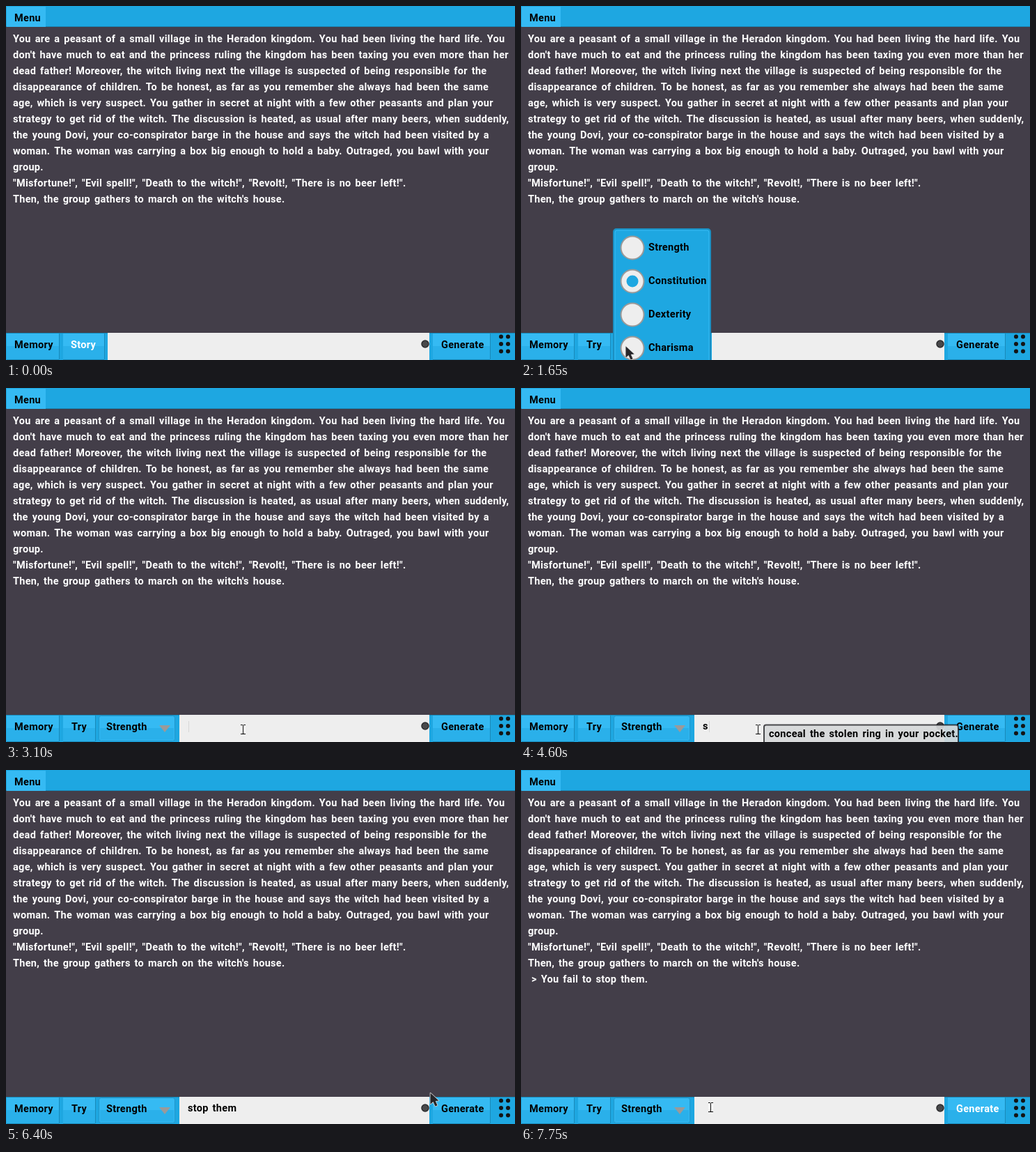
Animation, 731 px wide and 508 px high, one loop 8000 ms. Source, as an HTML page with a canvas:

```html
<!DOCTYPE html>
<html lang="en">
<head>
<meta charset="utf-8">
<title>Story game</title>
<style>
  html, body { margin: 0; width: 100%; height: 100%; overflow: hidden; background: #433e49; }
  canvas { display: block; }
</style>
</head>
<body>
<canvas id="stage" width="731" height="508"></canvas>
<script>
const ctx = document.getElementById('stage').getContext('2d');
const LOOP = 8000, STEP = 50;
const BLUE = '#1ea7e1', LIGHT = '#35baf3', SHADE = '#2ab0ea', EDGE = '#1989b9', PALE = '#eeeeee';
const BLACK = '#000', WHITE = '#fff', PRESSED = '#66727a';
const TOP = 469, INPUT_END = 608;

const STORY = [
  'You are a peasant of a small village in the Heradon kingdom. You had been living the hard life. You',
  "don't have much to eat and the princess ruling the kingdom has been taxing you even more than her",
  'dead father! Moreover, the witch living next the village is suspected of being responsible for the',
  'disappearance of children. To be honest, as far as you remember she always had been the same',
  'age, which is very suspect. You gather in secret at night with a few other peasants and plan your',
  'strategy to get rid of the witch. The discussion is heated, as usual after many beers, when suddenly,',
  'the young Dovi, your co-conspirator barge in the house and says the witch had been visited by a',
  'woman. The woman was carrying a box big enough to hold a baby. Outraged, you bawl with your',
  'group.',
  '"Misfortune!", "Evil spell!", "Death to the witch!", "Revolt!, "There is no beer left!".',
  "Then, the group gathers to march on the witch's house."
];
const STATS = ['Strength', 'Constitution', 'Dexterity', 'Charisma'];
const TYPED = 'stop them';
const KEY_TIMES = [4600, 4750, 4800, 4950, 5050, 5150, 5250, 5300, 5400];

// Pointer path: time, x, y
const PATH = [
  [0, 124, -22], [500, 109, 482], [700, 107, 490], [1400, 107, 490],
  [1600, 150, 488], [1750, 150, 488], [2050, 152, 440], [2300, 146, 385],
  [2550, 152, 344], [2650, 152, 344], [2950, 340, 489], [3100, 340, 490],
  [6100, 340, 490], [6300, 560, 460], [6400, 609, 463], [6500, 640, 482],
  [6800, 640, 484], [7300, 118, 313], [7400, 118, 313], [7750, 272, 484], [8000, 272, 484]
];

// Right side of the button, left side of the next item, label x
const MODES = {
  Story: [141, 146, 93], Do: [125, 130, 96], Say: [129, 134, 94], Try: [128, 132, 94]
};

function pointer(t) {
  let i = 1;
  while (i < PATH.length - 1 && PATH[i][0] < t) i++;
  const [t0, x0, y0] = PATH[i - 1], [t1, x1, y1] = PATH[i];
  const u = (t - t0) / (t1 - t0), e = u * u * (3 - 2 * u);
  return { x: Math.round(x0 + (x1 - x0) * e), y: Math.round(y0 + (y1 - y0) * e) };
}

function rect(x, y, w, h, color) {
  ctx.fillStyle = color;
  ctx.fillRect(x, y, w, h);
}

function panel(x, y, w, h, r, fill, stroke, width = 1) {
  ctx.beginPath();
  ctx.roundRect(x, y, w, h, r);
  ctx.fillStyle = fill;
  ctx.fill();
  ctx.strokeStyle = stroke;
  ctx.lineWidth = width;
  ctx.stroke();
}

function disc(x, y, r, fill, stroke, width) {
  ctx.beginPath();
  ctx.arc(x, y, r, 0, 7);
  ctx.fillStyle = fill;
  ctx.fill();
  if (!stroke) return;
  ctx.strokeStyle = stroke;
  ctx.lineWidth = width;
  ctx.stroke();
}

function label(s, x, y, color = BLACK) {
  ctx.fillStyle = color;
  ctx.fillText(s, x, y);
}

function button(x, right, text, textX, color) {
  const y = TOP + 1, h = 37;
  rect(x, y, right - x, h, LIGHT);
  rect(x, y + 18, right - x, h - 18, SHADE);
  rect(right, y, 1, h, EDGE);
  rect(x, y + h, right - x, 1, EDGE);
  label(text, textX, 491, color);
}

function dropdown(text, color) {
  const right = 144 + Math.round(ctx.measureText(text).width) + 40;
  panel(133.5, 470.5, right - 134, 36, 3, LIGHT, '#2196cb');
  rect(135, 488, right - 137, 17, SHADE);
  label(text, 144, 491, color);
  ctx.beginPath();
  ctx.moveTo(right - 23, 484);
  ctx.lineTo(right - 7, 484);
  ctx.lineTo(right - 15, 494);
  ctx.fillStyle = '#9a9a9a';
  ctx.fill();
  return right + 6;
}

function popup(p, picked, hover) {
  panel(133, 320, 139, 200, 4, BLUE, '#1b8fc2', 2);
  panel(135, 322, 135, 200, 3, BLUE, LIGHT);
  STATS.forEach((s, i) => {
    const y = 347 + 48 * i;
    disc(160, y, 16.5, PALE, '#999', 2);
    if (i === picked) disc(160, y, 8.5, BLUE);
    label(s, 183, y + 4, hover && Math.abs(p.y - y) < 22 ? WHITE : BLACK);
  });
}

function tooltip() {
  panel(349, 483.5, 279, 30, 3, 'rgba(214,216,218,.92)', 'rgba(20,20,24,.75)', 2);
  label('conceal the stolen ring in your pocket.', 356, 501);
}

function arrow({ x, y }) {
  const pts = [[0, 0], [0, 16], [4, 12.5], [7, 19], [10, 17.7], [7.2, 11.5], [12, 11]];
  ctx.beginPath();
  pts.forEach(([dx, dy]) => ctx.lineTo(x + dx + .5, y + dy + .5));
  ctx.closePath();
  ctx.lineJoin = 'round';
  ctx.lineWidth = 1.6;
  ctx.strokeStyle = '#d8d8d8';
  ctx.stroke();
  ctx.fillStyle = '#26262a';
  ctx.fill();
}

function beam({ x, y }) {
  rect(x - 3, y - 7, 7, 14, WHITE);
  rect(x, y - 6, 1, 13, BLACK);
  for (const dy of [-7, 6]) {
    rect(x - 3, y + dy, 3, 1, BLACK);
    rect(x + 1, y + dy, 3, 1, BLACK);
  }
}

function draw(t) {
  const p = pointer(t);
  const during = (a, b) => t >= a && t < b;
  const isOpen = during(1600, 2700), sent = t >= 6800;
  const mode = t < 650 ? 'Story' : t < 950 ? 'Do' : t < 1200 ? 'Say' : 'Try';
  const down = during(550, 650) || during(900, 950) || during(1150, 1200);
  const [modeEnd, next, modeX] = MODES[mode];

  rect(0, 0, 731, 508, '#433e49');
  rect(0, 0, 731, 30, BLUE);
  rect(0, 29, 731, 1, EDGE);
  rect(1, 1, 56, 29, LIGHT);
  ctx.font = 'bold 14.5px Roboto, sans-serif';
  ctx.letterSpacing = '0.3px';
  ctx.wordSpacing = '2px';
  label('Menu', 12, 22);
  STORY.forEach((line, i) => label(line, 10, 52 + 23 * i, WHITE));
  if (sent) label('> You fail to stop them.', 15, 305, WHITE);

  rect(0, TOP, 731, 39, BLUE);
  rect(0, TOP, 731, 1, EDGE);
  button(1, 76, 'Memory', 12, BLACK);
  button(82, modeEnd, mode, modeX, down ? PRESSED : t < 1500 ? WHITE : BLACK);

  let inputX = next;
  if (mode === 'Try') {
    const onDrop = during(1500, 1600) || during(2700, 2900);
    inputX = dropdown(t < 2700 ? 'Constitution' : 'Strength', onDrop ? WHITE : BLACK);
  }
  rect(inputX, TOP, INPUT_END - inputX, 39, PALE);
  const typed = sent ? '' : TYPED.slice(0, KEY_TIMES.filter(k => t >= k).length);
  label(typed, 261, 490);
  if (during(2950, 5400)) rect(262 + Math.round(ctx.measureText(typed).width), 478, 1, 16, '#d6d6d6');
  disc(602, 485, 5, '#48484a', '#2c2c2e', 1.5);

  button(613, 695, 'Generate', 625, during(6700, 6800) ? PRESSED : t >= 6500 ? WHITE : BLACK);
  for (const x of [711, 721]) for (const y of [474.5, 485, 495.5]) disc(x, y, 3, '#141414');

  if (isOpen) popup(p, t < 2550 ? 1 : 0, t >= 1800);
  if (during(3650, 6150)) tooltip();

  const overInput = !isOpen && p.y > TOP && p.x > inputX && p.x < INPUT_END;
  (overInput ? beam : arrow)(p);
}

function tick(now) {
  draw(Math.floor(now % LOOP / STEP) * STEP);
  requestAnimationFrame(tick);
}
requestAnimationFrame(tick);
</script>
</body>
</html>
```
